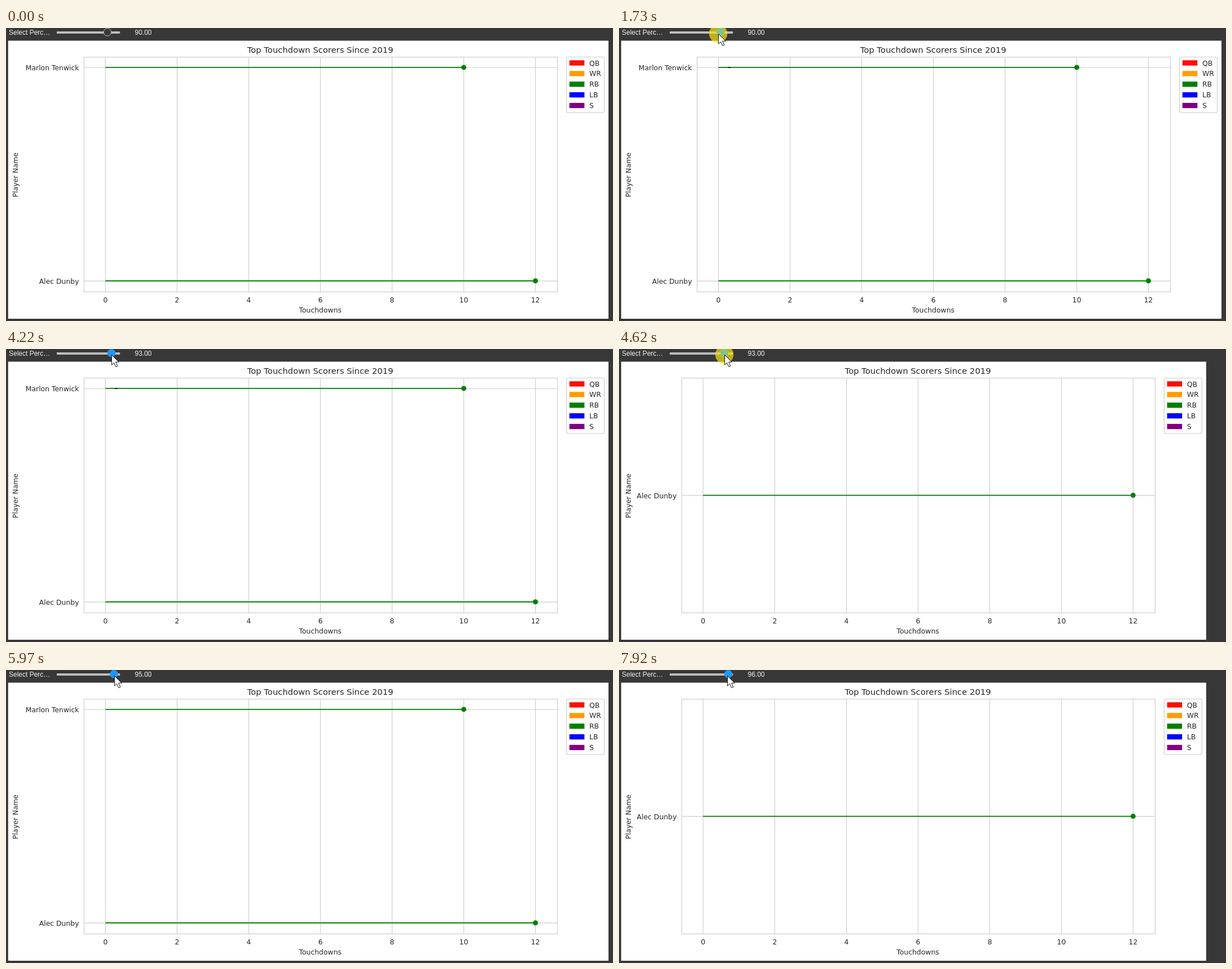
An HTML page for the animation above (7.99 s loop, 1077 by 520 pixels).

```html
<!DOCTYPE html>
<html lang="en">
<head>
<meta charset="utf-8">
<title>Top Touchdown Scorers</title>
<style>
  html, body { margin: 0; width: 100%; height: 100%; overflow: hidden; background: #383838; }
  svg { display: block; width: 1077px; height: 520px; }
  text { font-family: "DejaVu Sans", sans-serif; font-size: 12.4px; fill: #262626; }
  .title { font-size: 14.8px; }
  .bar { font: 12px "Liberation Sans", Arial, sans-serif; fill: #f2f2f2; }
  .grid { stroke: #ccc; stroke-width: 1.15; fill: none; }
</style>
</head>
<body>
<svg viewBox="0 0 1077 520">
  <rect width="1077" height="520" fill="#383838"/>
  <g id="charts"></g>
  <path id="fleck" d="M193 70.2h5" stroke="#000" stroke-width="1.5"/>
  <text class="bar" x="5" y="12" textLength="">Select Perc…</text>
  <rect x="90" y="6" width="112.3" height="4" rx="1" fill="#bdbdbd"/>
  <circle id="knob" cy="7.3" r="6.8"/>
  <text class="bar" id="value" x="228.5" y="12"></text>
  <g id="cursor">
    <circle id="halo" r="16.2" fill="#f8e214" fill-opacity=".7"/>
    <circle id="glow" r="6.8" fill="#82c48a"/>
    <path d="M.5 .5V18.3L4.6 14.4L7.8 21.6L10.9 20.2L7.7 13.2H13.2Z"
      fill="#fff" stroke="#111" stroke-width="1"/>
  </g>
</svg>
<script>
const LOOP = 7990;
const NS = "http://www.w3.org/2000/svg";
const $ = id => document.getElementById(id);

function add(parent, tag, attrs, text) {
  const node = document.createElementNS(NS, tag);
  for (const key in attrs) node.setAttribute(key, attrs[key]);
  if (text !== undefined) node.textContent = text;
  parent.appendChild(node);
  return node;
}

const positions = [["QB", "#ff0d00"], ["WR", "#ff9c06"], ["RB", "#008000"], ["LB", "#0000ff"], ["S", "#800080"]];

function buildChart(left, players) {
  const g = add($("charts"), "g", {});
  const top = 51.6, bottom = 468.4, width = 840;
  const xAt = score => left + 37.9 + score * 63.58;
  const label = (x, y, text, anchor = "middle", cls = "") =>
    add(g, "text", { x, y, "text-anchor": anchor, class: cls }, text);

  add(g, "rect", { x: 3.8, y: 22.5, width: left + 926.7, height: 493.5, fill: "#fff" });
  for (let score = 0; score <= 12; score += 2) {
    add(g, "path", { class: "grid", d: `M${xAt(score)} ${top}V${bottom}` });
    label(xAt(score), 487, score);
  }
  for (const [, , y] of players) add(g, "path", { class: "grid", d: `M${left} ${y + .3}h${width}` });
  add(g, "rect", { class: "grid", x: left, y: top, width, height: bottom - top });

  for (const [name, score, y] of players) {
    add(g, "path", { d: `M${xAt(0)} ${y}H${xAt(score)}`, stroke: "#008000", "stroke-width": 1.9 });
    add(g, "circle", { cx: xAt(score), cy: y, r: 4.5, fill: "#008000" });
    label(left - 9, y + 5.3, name, "end");
  }

  label(left + 419, 43.8, "Top Touchdown Scorers Since 2019", "middle", "title");
  label(left + 419, 504.6, "Touchdowns");
  add(g, "text", { transform: "translate(21.3 260.6) rotate(-90)", "text-anchor": "middle" }, "Player Name");

  add(g, "rect", { class: "grid", x: left + 856, y: 51.5, width: 67, height: 98.5, rx: 2.5 });
  positions.forEach(([name, fill], i) => {
    const y = 57.3 + i * 18.9;
    add(g, "rect", { x: left + 861.2, y, width: 26.6, height: 9.3, fill });
    label(left + 896.5, y + 9.2, name, "start");
  });
  return g;
}

const pair = buildChart(138.5, [["Marlon Tenwick", 10, 69.9], ["Alec Dunby", 12, 448.8]]);
const single = buildChart(111.3, [["Alec Dunby", 12, 259.6]]);

// Stepped progress: the first step lands at start, the last at end.
function steps(t, start, end, count) {
  if (t < start) return 0;
  const k = Math.floor((t - start) / (end - start) * (count - 1) + 1e-6) + 1;
  return Math.min(k, count) / count;
}
const between = (t, a, b) => t >= a && t < b;
const mix = (a, b, p) => a + (b - a) * p;
const show = (node, on) => node.setAttribute("visibility", on ? "inherit" : "hidden");

function pointer(t) {
  if (t < 660) {
    const p = (steps(t, 200, 400, 4) - .25) / .75;
    return [mix(871, 565, p), mix(503, 387, p)];
  }
  const p = steps(t, 660, 1400, 11);
  const eased = p * p * (3 - 2 * p);
  const x = mix(565, 176, eased)
    + 7 * steps(t, 2050, 2400, 6)
    + 4 * steps(t, 4010, 4220, 4)
    + 5 * steps(t, 4960, 5250, 5)
    + 5 * steps(t, 6660, 6920, 4)
    - 5 * steps(t, 7850, 7920, 2);
  return [x, mix(387, 10, eased)];
}

function draw(t) {
  const value = Math.round(90
    + 3 * steps(t, 2050, 2400, 6)
    + 2 * steps(t, 4960, 5250, 5)
    + steps(t, 6660, 6920, 4));
  const knobX = 180 + (value - 90) * 2.32;
  const [x, y] = pointer(t);
  const hover = t >= 1400;
  const pressed = between(t, 1730, 3150) || between(t, 4620, 5510) || between(t, 6400, 7060);
  const alone = between(t, 4420, 5970) || t >= 6920;

  show(pair, !alone);
  show(single, alone);
  show($("fleck"), between(t, 1330, 4420));

  const knob = $("knob");
  knob.setAttribute("cx", knobX);
  knob.setAttribute("fill", hover ? "#2196f3" : "#383838");
  knob.setAttribute("stroke", hover ? "#2196f3" : "#bdbdbd");
  $("value").textContent = value.toFixed(2);

  show($("cursor"), t >= 200);
  $("cursor").setAttribute("transform", `translate(${x} ${y})`);
  show($("halo"), pressed);
  show($("glow"), pressed);
  $("glow").setAttribute("cx", knobX - x);
  $("glow").setAttribute("cy", 7.3 - y);
}

const began = performance.now();
function frame() {
  draw((performance.now() - began) % LOOP);
  requestAnimationFrame(frame);
}
draw(0);
requestAnimationFrame(frame);
</script>
</body>
</html>
```
